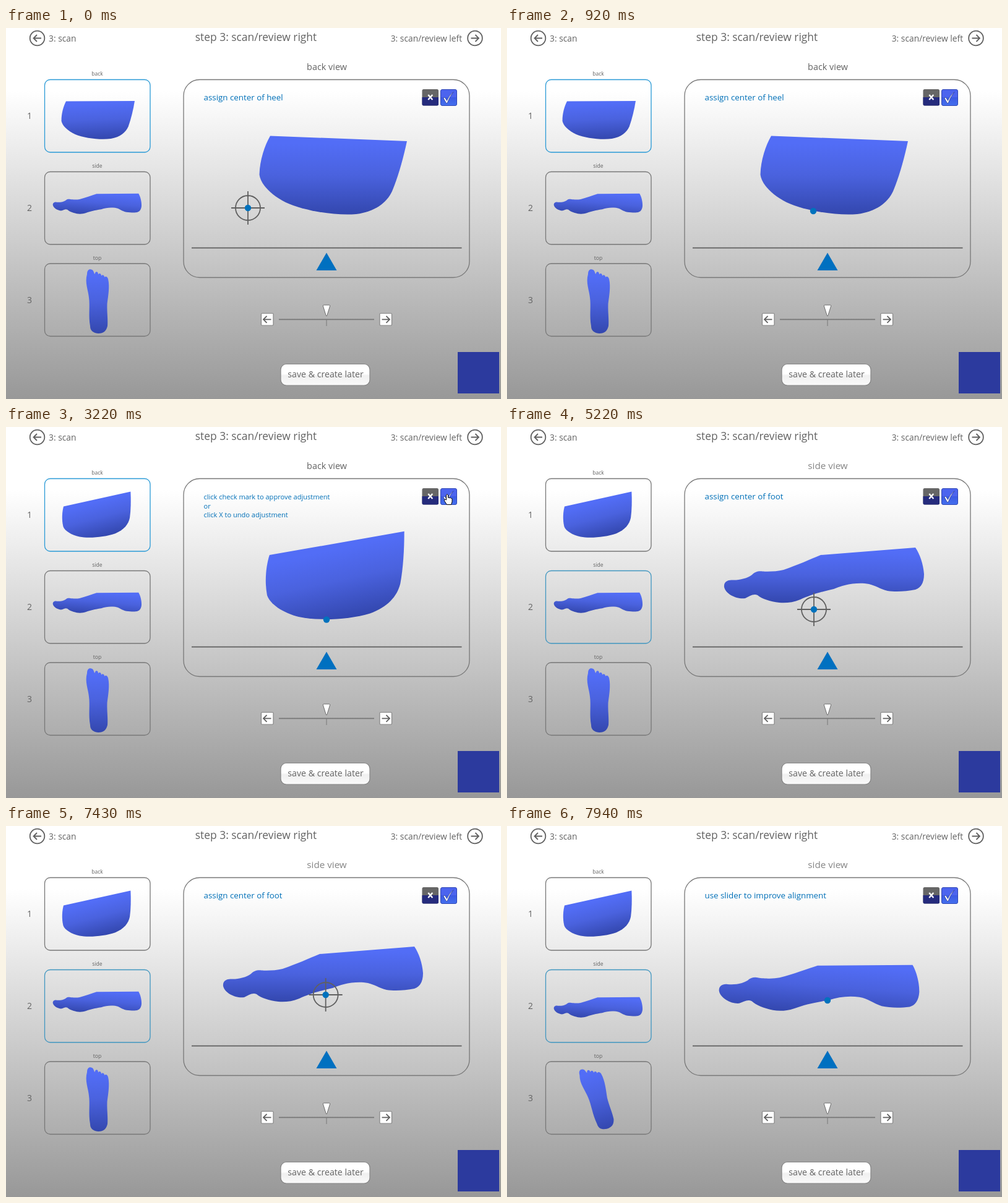
Animation of 800x600 px, one loop 8 s. Source, as an HTML page:

```html
<!DOCTYPE html>
<html lang="en">
<head>
<meta charset="utf-8">
<title>Scan review</title>
<style>
  html, body { margin: 0; width: 100%; height: 100%; overflow: hidden; }
  svg { display: block; width: 800px; height: 600px; }
  text { font-family: "Open Sans", "Noto Sans", sans-serif; fill: #636363; }
  .mid { text-anchor: middle; }
  .small { font-size: 8.6px; }
  .nav { font-size: 13.8px; }
  .hint { fill: #0070b8; }
  .frame { fill: none; stroke: #777; stroke-width: 1.3; }
  .line { fill: none; stroke: #606060; stroke-width: 1.8; }
  .box { fill: #fff; stroke: #858585; stroke-width: 1.2; }
</style>
</head>
<body>
<svg viewBox="0 0 800 600">
  <defs>
    <linearGradient id="page" x2="0" y2="1">
      <stop offset=".17" stop-color="#fff"/><stop offset="1" stop-color="#989898"/>
    </linearGradient>
    <linearGradient id="skin" x2="0" y2="1">
      <stop offset=".1" stop-color="#526df6"/><stop offset=".5" stop-color="#4a62de"/><stop offset="1" stop-color="#3347ae"/>
    </linearGradient>
    <linearGradient id="button" x2="0" y2="1">
      <stop offset=".45" stop-color="#fff"/><stop offset=".55" stop-color="#f0f0f0"/><stop offset="1" stop-color="#fafafa"/>
    </linearGradient>
    <linearGradient id="approve" x2="0" y2="1">
      <stop offset=".5" stop-color="#4c64ee"/><stop offset=".5" stop-color="#3c5ae4"/><stop offset="1" stop-color="#4470ee"/>
    </linearGradient>
    <path id="arrow" d="M-6.5 0H6M.5-5.5L6 0L.5 5.5"/>
    <path id="heel" fill="url(#skin)" d="M427 174.5L648 183C642 211 634 240 624 264C615 283 596 297 566 301C530 304 480 295 452 282C428 270 411 252 409.5 237C410 214 418 190 427 174.5Z"/>
    <path id="foot" fill="url(#skin)" d="M351 259C350 251 356 247 364 247.5C375 248 388 245 396 239C400 234 407 232.5 413 233.5C420 234 436 234 447 231C470 223 490 214 507 207L660 195C667 205 673 222 674 238C674 252 669 260 660 263C645 266 628 267 615 265C600 261 592 254 578 253C560 252 545 255 528 262C505 267 490 272 474 279C462 284 450 285 440 284C425 282 412 278 405 272C398 269 392 274 385 277C372 279 354 271 351 259Z"/>
  </defs>

  <rect width="800" height="600" fill="url(#page)"/>

  <!-- header -->
  <g class="line">
    <circle cx="50.5" cy="16.5" r="11.8"/><use href="#arrow" transform="translate(50.5 16.5) scale(-1 1)"/>
    <circle cx="758" cy="16.5" r="11.8"/><use href="#arrow" transform="translate(758 16.5)"/>
  </g>
  <text class="nav" x="69" y="21.5">3: scan</text>
  <text class="nav" x="737" y="21.5" text-anchor="end">3: scan/review left</text>
  <text class="mid" x="404" y="21.3" font-size="17.4">step 3: scan/review right</text>

  <!-- thumbnails -->
  <g class="mid small">
    <text x="147.5" y="76.5">back</text><text x="147.5" y="226">side</text><text x="147.5" y="375">top</text>
  </g>
  <g class="mid" font-size="14">
    <text x="38" y="147">1</text><text x="38" y="296">2</text><text x="38" y="444.5">3</text>
  </g>
  <rect class="frame" id="backFrame" x="62.5" y="83.5" width="170.5" height="117.5" rx="9"/>
  <rect class="frame" id="sideFrame" x="62.5" y="232.5" width="170.5" height="117.5" rx="9"/>
  <rect class="frame" x="62.5" y="381" width="170.5" height="117.5" rx="9"/>
  <use id="backThumb" href="#heel"/>
  <use id="sideThumb" href="#foot"/>
  <path id="topThumb" fill="url(#skin)" d="M131 398C131 391 135 389 139 391C142 392 142 397 143.5 398C144 393 149 393 149 398.5C151 395.5 154 397 154 401C156 398 159 400 159 403C161 401 164 402 165 406C168 418 165 434 163.5 446C163 460 165 472 164 482C162 490 158 494 149 494C140 493 136 489 136 482C133 465 136 450 134 436C133 424 127 412 131 398Z"/>

  <!-- main view -->
  <text class="mid" id="viewTitle" x="518.5" y="68"/>
  <rect class="frame" x="287" y="83.5" width="462" height="320" rx="26"/>
  <g id="hints"></g>
  <rect x="672.5" y="99" width="26.5" height="26.5" rx="2.5" fill="#666"/>
  <path d="M672.5 112H699V123Q699 125.5 696.5 125.5H675Q672.5 125.5 672.5 123Z" fill="#252b7c"/>
  <path d="M682.3 108L689.3 116M689.3 108L682.3 116" stroke="#fff" stroke-width="2.3"/>
  <rect x="702.5" y="99.5" width="26" height="26" rx="2.5" fill="url(#approve)" stroke="#3047b4"/>
  <path d="M707 113.5L709 112L712.5 117.5Q716 109 723 103.5Q717 111 713 121.5H711.5Z" fill="#fff" stroke="#26368c" stroke-width=".7"/>
  <use id="shape"/>
  <path d="M300 355.7H736.5" stroke="#606060" stroke-width="1.8"/>
  <path d="M518 363.5L534.5 392H501.5Z" fill="#0070c0"/>
  <g id="marker">
    <path class="line" id="crosshair" d="M-27 0H27M0-27V27M-20 0A20 20 0 1 0 20 0A20 20 0 1 0-20 0"/>
    <circle r="5.2" fill="#0072bd"/>
  </g>
  <path id="hand" fill="#fff" stroke="#000" stroke-linejoin="round" d="M711.5 118V110Q713 107.5 714.5 110V114.5Q716 113 717 115Q718.5 113.5 719.5 115.5Q721 114.5 721 117V121L719.5 125.5H712.5L708.5 119.5Q708 116.5 710 117Z"/>

  <!-- slider -->
  <g class="box">
    <rect x="412.5" y="461.5" width="19.5" height="19.5" rx="1.5"/><rect x="604" y="461.5" width="19.5" height="19.5" rx="1.5"/>
  </g>
  <g class="line">
    <use href="#arrow" transform="translate(422 471.3) scale(-1 1)"/><use href="#arrow" transform="translate(614 471.3)"/>
  </g>
  <path d="M441 471.3H595" stroke="#777" stroke-width="1.8"/>
  <path d="M518 472V482" stroke="#777"/>
  <path d="M513.5 448H522.5Q524 448 523.5 450L518.8 465Q518 467 517.2 465L512.5 450Q512 448 513.5 448Z" fill="#fff" stroke="#6c6c6c"/>

  <rect x="444" y="543.5" width="144" height="34.5" rx="9" fill="url(#button)" stroke="#858585" stroke-width="1.2"/>
  <text class="mid" x="516.5" y="565" font-size="14.2">save &amp; create later</text>
  <rect x="730" y="524" width="67" height="67" fill="#2c3a9e"/>
</svg>

<script>
const el = id => document.getElementById(id);
const LOOP = 8000, STEP = 70, SIDE_START = 5220;

// Each view: the marker travels to the shape, then shape and marker turn into place.
const back = { title: "back view", size: 14.4, ask: "assign center of heel", href: "#heel",
  start: 500, from: [391, 291], to: [495, 296], rest: [518, 311.5], turn: -12.2 };
const side = { title: "side view", size: 15.2, ask: "assign center of foot", href: "#foot",
  start: 7220, from: [496, 295], to: [527, 262], rest: [518, 282], turn: 4.1 };

const settled = ({ to, rest, turn }) =>
  `translate(${rest[0] - to[0]} ${rest[1] - to[1]}) rotate(${turn} ${to})`;

let shownHint;
function setHint(lines) {
  const key = lines.join("|");
  if (key === shownHint) return;
  shownHint = key;
  const size = lines.length > 1 ? 11.05 : 13.35;
  el("hints").innerHTML = lines.map((line, i) =>
    `<text class="hint" x="319.5" y="${117 + i * 14.7}" font-size="${size}">${line}</text>`).join("");
}

function draw(t) {
  const onSide = t >= SIDE_START, view = onSide ? side : back;
  const elapsed = t - view.start;
  const placed = elapsed >= 6 * STEP, turned = elapsed >= 520;
  const approving = !onSide && t >= 3220;

  el("viewTitle").textContent = view.title;
  el("viewTitle").setAttribute("font-size", view.size);
  el("viewTitle").style.fill = onSide ? "#858585" : "";
  setHint(approving ? ["click check mark to approve adjustment", "or", "click X to undo adjustment"]
    : [elapsed >= 720 ? "use slider to improve alignment" : view.ask]);

  el("shape").setAttribute("href", view.href);
  el("shape").setAttribute("transform", turned ? settled(view) : "");
  const progress = elapsed < 0 ? 0 : Math.min(1, (Math.floor(elapsed / STEP) + 1) / 6);
  const spot = turned ? view.rest : view.from.map((a, i) => a + (view.to[i] - a) * progress);
  el("marker").setAttribute("transform", `translate(${spot})`);
  el("crosshair").style.display = placed ? "none" : "";
  el("hand").style.display = approving ? "" : "none";

  el("backFrame").style.stroke = onSide ? "" : "#2a9ad6";
  el("sideFrame").style.stroke = onSide ? "#4096c0" : "";
  const backTurned = onSide || turned;
  el("backThumb").setAttribute("transform",
    `translate(${backTurned ? "93 128.5" : "97 118.5"}) scale(.502) rotate(${backTurned ? -14.7 : -2.45}) translate(-427 -174.5)`);
  el("sideThumb").setAttribute("transform",
    `translate(-76.1 ${onSide && turned ? 177.3 : 168.3}) scale(.443) ${settled(side)}`);
  el("topThumb").setAttribute("transform",
    onSide && placed ? "translate(9 -4) rotate(-16.2 150 482)" : "");
}

function tick() {
  draw(performance.now() % LOOP);
  requestAnimationFrame(tick);
}
tick();
</script>
</body>
</html>
```
